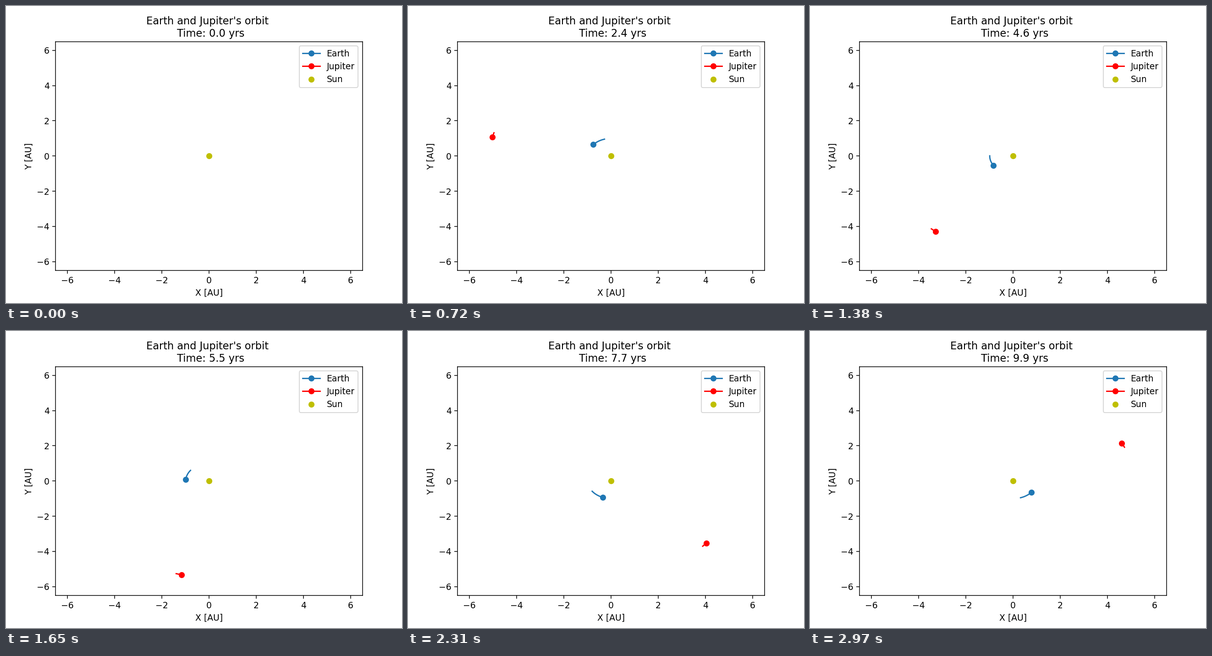
Animation of 864x648 px, one loop 3 s. Source, as a matplotlib script:

```python
import numpy as np
import matplotlib.pyplot as plt
from matplotlib.animation import FuncAnimation

FRAMES, INTERVAL = 100, 30
STEPS = 10      # samples per frame
DT = 0.01       # years per sample


def orbit(a, e, perihelion, t):
    """Kepler orbit around the origin, starting from mean anomaly pi or 0."""
    start, axis = perihelion
    mean = start + 2 * np.pi * t / a ** 1.5
    ecc = mean.copy()
    for _ in range(8):
        ecc = mean + e * np.sin(ecc)
    x = a * (np.cos(ecc) - e)
    y = a * np.sqrt(1 - e * e) * np.sin(ecc)
    c, s = np.cos(axis), np.sin(axis)
    return np.array([c * x - s * y, s * x + c * y])


t = np.arange(FRAMES * STEPS) * DT
# Earth starts at aphelion on +x, Jupiter at perihelion on +y.
earth = orbit(1.00023, 0.0165, (np.pi, np.pi), t)
jupiter = orbit(5.204, 0.0487, (0.0, np.pi / 2), t)

fig, ax = plt.subplots(figsize=(6.4, 4.8), dpi=135)
nowhere = [np.nan]
earth_line, = ax.plot(nowhere, nowhere, "o-", color="C0",
                      markevery=[-1], label="Earth")
jupiter_line, = ax.plot(nowhere, nowhere, "ro-",
                        markevery=[-1], label="Jupiter")
ax.plot([0], [0], "yo", label="Sun")
ax.set(xlim=(-6.5, 6.5), ylim=(-6.5, 6.5), xlabel="X [AU]", ylabel="Y [AU]")
ax.legend(loc="upper right")
title = ax.set_title("")


def update(i):
    for line, path in ((earth_line, earth), (jupiter_line, jupiter)):
        if i:
            line.set_data(*path[:, (i - 1) * STEPS:i * STEPS])
        else:
            line.set_data(nowhere, nowhere)
    title.set_text(f"Earth and Jupiter's orbit \n Time: {i * STEPS * DT:.1f} yrs")
    return earth_line, jupiter_line, title


anim = FuncAnimation(fig, update, frames=FRAMES, interval=INTERVAL,
                     init_func=lambda: update(0), repeat=True, repeat_delay=0)
plt.show()
```
